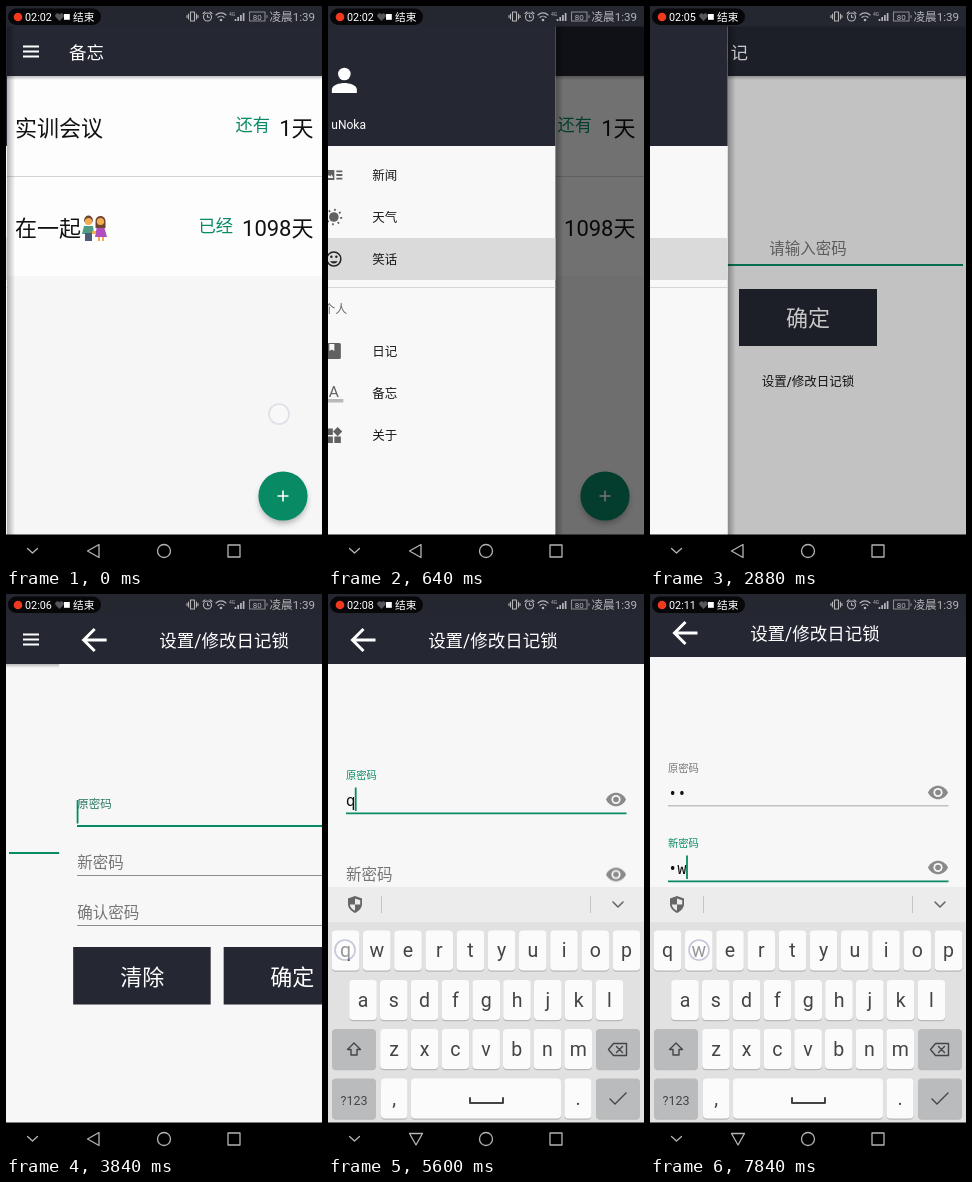
An HTML page for the animation above (8000 ms loop, 316 by 560 pixels).

```html
<!DOCTYPE html>
<html lang="zh-CN">
<head>
<meta charset="utf-8">
<title>备忘</title>
<style>
:root { --green: #088a65; --dark: #252733; --grey: #757575; --out: cubic-bezier(.333, .667, .667, 1); }
html, body { margin: 0; width: 100%; height: 100%; overflow: hidden; background: #f7f7f7; }
svg { display: block; width: 316px; height: 560px; }
text { font-family: Roboto, "Noto Sans CJK SC", "Noto Sans CJK", sans-serif; white-space: pre; }
.big { font-size: 22px; fill: #111; }
.tag { font-size: 17.3px; fill: var(--green); }
.title { font-size: 17.5px; fill: #fff; }
.button { font-size: 22px; font-weight: 500; fill: #fff; text-anchor: middle; }
.mid { text-anchor: middle; }
.end { text-anchor: end; }
.item { font-size: 12.5px; font-weight: 500; fill: #161616; }
.ico { fill: #616161; }
.line { fill: none; stroke-linecap: round; stroke-linejoin: round; }
.hint { font-size: 15.5px; fill: var(--grey); }
.pass { font: 15.5px "Noto Sans Mono", monospace; fill: #111; }
.rule { height: 1px; fill: #8c8c8c; }
.rule.on { height: 2px; fill: var(--green); }
.key { font-size: 19.5px; fill: #444; text-anchor: middle; }

#drawer, #scrim, #settings, #pan, #keys, .field, .field .hint { animation: 8s linear infinite; }
#drawer { animation-name: drawer; }
#scrim { animation-name: scrim; }
#settings { animation-name: slide; }
#pan { animation-name: pan; }
#keys { animation-name: rise; }
#f0 { animation-name: spreadUp; }
#f1 { animation-name: spreadDown; }
#f2 { animation-name: spreadLow; }
#f0 .hint { animation-name: float0; }
#f1 .hint { animation-name: float1; }

@keyframes drawer {
  0%, .5% { transform: translateX(-245px); animation-timing-function: var(--out); }
  11.8% { transform: none; }
  33.4% { transform: none; animation-timing-function: var(--out); }
  40.4%, 100% { transform: translateX(-262px); }
}
@keyframes scrim {
  0%, .5% { opacity: 0; animation-timing-function: var(--out); }
  11.8% { opacity: .6; }
  33.4% { opacity: .6; animation-timing-function: var(--out); }
  40.4%, 100% { opacity: 0; }
}
@keyframes slide {
  0%, 44.4% { transform: translateX(316px); animation-timing-function: var(--out); }
  51.2%, 100% { transform: none; }
}
@keyframes rise {
  0%, 60.1% { transform: translateY(267px); animation-timing-function: var(--out); }
  66.5%, 100% { transform: none; }
}
@keyframes pan {
  0%, 78.6% { transform: none; }
  80% { transform: translateY(-6px); }
  82%, 100% { transform: translateY(-7px); }
}
@keyframes spreadUp { 0%, 69.9% { transform: none; } 70%, 100% { transform: translateY(-12.5px); } }
@keyframes spreadDown { 0%, 69.9% { transform: none; } 70%, 100% { transform: translateY(12.5px); } }
@keyframes spreadLow { 0%, 69.9% { transform: none; } 70%, 100% { transform: translateY(37.5px); } }
@keyframes float0 {
  0%, 46.4% { transform: none; font-size: 15.5px; fill: #757575; }
  48.4% { transform: translateY(-11.8px); font-size: 10.6px; fill: #1c7a63; }
  50.4%, 78.9% { transform: translateY(-26px); font-size: 10.3px; fill: #088a65; }
  79%, 100% { transform: translateY(-26px); font-size: 10.3px; fill: #757575; }
}
@keyframes float1 {
  0%, 79.2% { transform: none; font-size: 15.5px; fill: #757575; }
  80.2% { transform: translateY(-3.4px); font-size: 13px; fill: #555; }
  82%, 100% { transform: translateY(-26px); font-size: 10.3px; fill: #088a65; }
}
</style>
</head>
<body>
<svg viewBox="0 0 316 560">
  <defs>
    <linearGradient id="fadeX"><stop stop-opacity=".3"/><stop offset="1" stop-opacity="0"/></linearGradient>
    <linearGradient id="fadeY" x2="0" y2="1"><stop stop-opacity=".25"/><stop offset="1" stop-opacity="0"/></linearGradient>
    <filter id="soft" x="-50%" y="-50%" width="200%" height="200%"><feGaussianBlur stdDeviation="3"/></filter>
    <g id="bar">
      <rect width="316" height="70" fill="#252733"/>
      <rect y="70" width="316" height="4" fill="url(#fadeY)"/>
      <path d="M17 40.5h16M17 45.5h16M17 50.5h16" stroke="#fff" stroke-width="2"/>
    </g>
    <g id="eye">
      <path d="M-10 0C-6-9 6-9 10 0C6 9-6 9-10 0Z" fill="#8a8a8a"/>
      <circle r="4.6" fill="#f7f7f7"/><circle r="2.8" fill="#8a8a8a"/>
    </g>
  </defs>

  <g id="memo">
    <rect width="316" height="530" fill="#f6f6f6"/>
    <rect y="70" width="316" height="200" fill="#fdfdfd"/>
    <rect y="170" width="316" height="1" fill="#d4d4d4"/>
    <use href="#bar"/>
    <text class="title" x="63" y="52.5">备忘</text>
    <text class="big" x="9" y="130">实训会议</text>
    <text class="tag" x="229.5" y="124.5">还有</text>
    <text class="big end" x="307.5" y="130">1天</text>
    <text class="big" x="9" y="230">在一起</text>
    <g id="couple">
      <path d="M78 220h9l1 8h-2v7h-7v-7h-3z" fill="#4f9c86"/>
      <path d="M79 227h7v8h-7z" fill="#4b5b78"/>
      <path d="M91 220h7l3 11h-12z" fill="#b04fc0"/>
      <path d="M92 231h2v4h-2zM96 231h2v4h-2zM86 225h4v3h-4z" fill="#f3ad4e"/>
      <path d="M89.5 222v-7a5 5 0 0 1 10 0v7z" fill="#6d4530"/>
      <circle cx="82.5" cy="214" r="4.4" fill="#6d4530"/>
      <circle cx="82.5" cy="215.5" r="3.6" fill="#f3ad4e"/><circle cx="94.5" cy="215.5" r="3.6" fill="#f3ad4e"/>
    </g>
    <text class="tag" x="192.5" y="225.5">已经</text>
    <text class="big end" x="307.5" y="230">1098天</text>
    <circle cx="277" cy="494" r="23.5" opacity=".3" filter="url(#soft)"/>
    <circle cx="277" cy="490" r="24.6" fill="#088a65"/>
    <path d="M271.5 490h11M277 484.5v11" stroke="#fff" stroke-width="1.6"/>
  </g>

  <g data-on="2640-8000">
    <rect width="316" height="530" fill="#f7f7f7"/>
    <use href="#bar"/>
    <text class="title" x="63" y="52.5">日记</text>
    <text class="hint mid" x="158" y="248">请输入密码</text>
    <rect x="3" y="258" width="310" height="2" fill="#088a65"/>
    <rect x="89" y="283" width="138" height="57" fill="#252733"/>
    <text class="button" x="158" y="320">确定</text>
    <text class="item mid" x="158" y="380">设置/修改日记锁</text>
  </g>

  <rect id="scrim" width="316" height="530"/>
  <g id="drawer">
    <rect x="246" width="8" height="530" fill="url(#fadeX)"/>
    <rect width="246" height="530" fill="#f8f8f8"/>
    <rect width="246" height="140" fill="#252733"/>
    <path d="M22.5 87v-3.5c0-4.5 8-6.5 12.5-6.5s12.5 2 12.5 6.5v3.5z" fill="#fff"/>
    <circle cx="35" cy="68" r="6.3" fill="#fff"/>
    <text x="22" y="122.5" font-size="12" fill="#fff">uNoka</text>
    <rect y="232" width="246" height="42" fill="#dadada"/>
    <rect y="281" width="246" height="1" fill="#d6d6d6"/>
    <text x="14" y="307.5" font-size="12" fill="#6b6b6b">个人</text>
    <g id="items"></g>
    <g class="ico">
      <path d="M16 164h9v10h-9zM27 164.5h6v1.8h-6zM27 168.1h6v1.8h-6zM27 171.7h6v1.8h-6z"/>
      <path d="M17.5 172l2-3 1.5 1.5 1.3-2 1.7 3.5z" fill="#f8f8f8"/>
      <circle cx="24.5" cy="211" r="4.8"/>
      <circle cx="24.5" cy="211" r="7.3" fill="none" stroke="#616161" stroke-width="2" stroke-dasharray="1.7 4.033"/>
      <circle cx="24.5" cy="253" r="7" fill="none" stroke="#222" stroke-width="1.5"/>
      <path d="M20.8 255.2c1.5 3 6 3 7.4 0z" fill="#222"/>
      <circle cx="22" cy="250.8" r="1.2" fill="#222"/><circle cx="27" cy="250.8" r="1.2" fill="#222"/>
      <rect x="18" y="337" width="13.5" height="16" rx="1.5"/>
      <path d="M20 338h5v7l-2.5-1.6-2.5 1.6z" fill="#f8f8f8"/>
      <text class="mid" x="24.5" y="391" font-size="15.5">A</text>
      <rect x="15" y="393" width="19" height="3.5" fill="#b9b9b9"/>
      <path d="M17 422.5h6.5v6.5h-6.5zM17 430.5h6.5v6.5h-6.5zM25 430.5h6.5v6.5h-6.5zM28.3 421l4.6 4.6-4.6 4.6-4.6-4.6z"/>
    </g>
  </g>

  <g id="settings">
    <rect width="316" height="530" fill="#f7f7f7"/>
    <g id="pan">
      <rect width="316" height="70" fill="#252733"/>
      <path d="M47.5 46H25M35.5 35L24.5 46l11 11" fill="none" stroke="#fff" stroke-width="3"/>
      <text class="title mid" x="165" y="52.5">设置/修改日记锁</text>
      <g id="fields"></g>
      <rect x="14" y="353" width="137.5" height="57.5" fill="#252733"/>
      <rect x="164.5" y="353" width="137.5" height="57.5" fill="#252733"/>
      <text class="button" x="83" y="390.5">清除</text>
      <text class="button" x="233" y="390.5">确定</text>
      <rect id="caret" width="1.8" height="23.5" fill="#088a65"/>
    </g>
  </g>

  <g id="keys">
    <rect y="293" width="316" height="267" fill="#e1e1e1"/>
    <rect y="293" width="316" height="35" fill="#ececec"/>
    <path d="M53.5 302v17M262.5 302v17" stroke="#c4c4c4"/>
    <path d="M27 302l7 2.5v5.5c0 4-3 7-7 9c-4-2-7-5-7-9v-5.5z" fill="#666"/>
    <path d="M27 304.5v6h5.2v-4.3zM27 310.5v6.2c-3-1.5-5-3.7-5.2-6.2z" fill="#ececec"/>
    <path class="line" d="M285 308l5 5 5-5" stroke="#666" stroke-width="1.6"/>
    <g id="caps"></g>
    <g class="line" stroke="#444" stroke-width="1.4">
      <path d="M26 449l6.5 6.5h-3.5v5.5h-6v-5.5h-3.5z"/>
      <path d="M285.500 449.500h13v12h-13l-5-6zM288.500 452.500l6 6M294.500 452.500l-6 6"/>
      <path d="M282 505l5 5 11-11"/>
      <path d="M142 504v5h33v-5" stroke-width="2"/>
    </g>
  </g>

  <rect data-on="0-4800 5320-8000" y="528.5" width="316" height="31.5"/>
  <g class="line" stroke="#b4b4b4" stroke-width="1.3">
    <path d="M21.5 542.5l5 4.5 5-4.5"/>
    <path data-on="0-4800" d="M93 538.5v13l-11.5-6.5z"/>
    <path data-on="4800-8000" d="M81.5 539.5h13l-6.5 11.5z"/>
    <circle cx="158" cy="545" r="6.5"/>
    <rect x="222" y="539" width="12" height="12"/>
  </g>

  <g id="status">
    <rect width="316" height="20.5" fill="#242630"/>
    <rect x="2" y="2.5" width="93" height="16.5" rx="8.2" fill="#07070a"/>
    <text id="carrier" x="6" y="15" font-size="11" fill="#4c4d52">中</text>
    <circle id="rec" cx="12" cy="11" r="4.3" fill="#f0391f"/>
    <text id="clock" x="19" y="14.7" font-size="10.8" fill="#fff"></text>
    <path d="M53.5 15l-4-4a2.3 2.3 0 0 1 4-2.5a2.3 2.3 0 0 1 4 2.5z" fill="#55565b"/>
    <rect x="58" y="8" width="5.8" height="5.8" fill="#fff"/>
    <text x="67" y="15" font-size="10.7" fill="#fff">结束</text>
    <g class="line" stroke="#b5b5b8" stroke-width="1.1">
      <path d="M184.5 6h4v9h-4zM182.5 8v5M190.5 8v5M181 9.5v2M192 9.5v2"/>
      <circle cx="201.5" cy="11" r="4"/><path d="M201.5 9v2.3h1.8M197 7.5l2-1.7M206 7.5l-2-1.7"/>
      <path d="M210 9a7 7 0 0 1 10 0M212 11.5a4.3 4.3 0 0 1 6 0"/>
      <path d="M229.5 15v-2M232.2 15v-4M234.9 15v-6M237.6 15v-8" stroke-width="1.7" stroke-linecap="butt"/>
      <path d="M243.5 6h15.5v9h-15.5zM261 9.5v2" stroke="#8c8c90"/>
    </g>
    <circle cx="215" cy="14" r="1.3" fill="#b5b5b8"/>
    <g fill="#b5b5b8">
      <text x="223" y="9.5" font-size="5">4G</text>
      <text class="mid" x="251.3" y="13.5" font-size="8">80</text>
      <text class="end" x="309" y="15" font-size="11.6">凌晨1:39</text>
    </g>
  </g>
  <circle id="touch" r="10" fill="#fff" fill-opacity=".45" stroke="#8d93b5" stroke-opacity=".5" stroke-width="1.6"/>
</svg>
<script>
const LOOP = 8000;
const $ = id => document.getElementById(id);

['新闻', '天气', '笑话', '日记', '备忘', '关于'].forEach((name, i) => {
  const y = 173.7 + i * 42 + (i > 2 ? 50 : 0);
  $('items').innerHTML += `<text class="item" x="63" y="${y}">${name}</text>`;
});

const fieldY = [218, 268, 318];
['原密码', '新密码', '确认密码'].forEach((name, i) => {
  const y = fieldY[i];
  $('fields').innerHTML += `<g id="f${i}" class="field">
    <text class="hint" x="18" y="${y + 5.7}">${name}</text>
    <text class="pass" x="18" y="${y + 6.5}"></text>
    <rect class="rule" x="18" y="${y + 13}" width="280.5"/>
    <use href="#eye" x="288" y="${y}"/></g>`;
});
const fields = [$('f0'), $('f1')];

function cap(x, y, w, label = '', fill = '#fbfbfb', size = 19.5) {
  $('caps').innerHTML += `<rect x="${x}" y="${y + 1.2}" width="${w}" height="40" rx="4" fill="#b8b8b8"/>
    <rect x="${x}" y="${y}" width="${w}" height="40" rx="4" fill="${fill}"/>
    <text class="key" x="${x + w / 2}" y="${y + 26.5}" style="font-size:${size}px">${label}</text>`;
}
const row = (letters, x, y, step) => [...letters].forEach((c, i) => cap(x + i * step - 13.8, y, 27.6, c));
row('qwertyuiop', 17.6, 336.5, 31.2);
row('asdfghjkl', 35, 386, 30.8);
row('zxcvbnm', 66, 435, 30.7);
for (const [x, y, label] of [[4, 435], [268, 435], [4, 484.5, '?123'], [268, 484.5]]) cap(x, y, 44, label, '#b9bbbc', 12.5);
cap(53, 484.5, 26.5, ',');
cap(83, 484.5, 150);
cap(236.5, 484.5, 27, '.');

// Each entry is [start time, value...]; the latest one that has begun applies
const clock = [[0, 2], [1280, 3], [1900, 4], [2400, 5], [3500, 6], [4480, 7], [4940, 8], [5740, 9], [6300, 10], [7340, 11]];
const typing = [
  [0, 0, '', ''], [3600, 0, '', ''], [5600, 0, 'q', ''], [5920, 0, '•w', ''],
  [6300, 1, '••', ''], [7200, 1, '••', 'q'], [7780, 1, '••', '•w']
];
// start, end, x, y, opacity
const touches = [
  [0, 140, 273, 408, .45], [2400, 2680, 80, 346, 1], [3300, 3480, 158, 376, 1], [4460, 4660, 120, 218, 1],
  [5540, 5700, 17, 356, 1], [5860, 6020, 49, 356, 1], [6240, 6500, 180, 277, .7],
  [7140, 7300, 17, 356, 1], [7740, 8000, 49, 356, 1]
];
const latest = (list, t) => list.filter(e => e[0] <= t).pop();
const setVisible = (el, on) => { el.style.visibility = on ? 'visible' : 'hidden'; };

const timed = [...document.querySelectorAll('[data-on]')].map(el =>
  ({ el, spans: el.dataset.on.split(' ').map(s => s.split('-').map(Number)) }));

function draw(t) {
  for (const { el, spans } of timed) setVisible(el, spans.some(([a, b]) => t >= a && t < b));

  $('clock').textContent = '02:' + String(latest(clock, t)[1]).padStart(2, '0');
  const recording = t < 1760 || t > 7800 || (t - 1760) % 1540 > 480;
  setVisible($('rec'), recording);
  setVisible($('carrier'), !recording);

  const [since, focus, ...texts] = latest(typing, t);
  fields.forEach((f, i) => {
    f.querySelector('.pass').textContent = texts[i];
    f.querySelector('.rule').classList.toggle('on', i === focus);
  });
  const spread = t < 5600 ? 0 : focus ? 12.5 : -12.5;
  $('caret').setAttribute('x', 17.5 + texts[focus].length * 9.3);
  $('caret').setAttribute('y', fieldY[focus] - 12 + spread);
  setVisible($('caret'), (t - since) % 1000 < 500);

  const touch = touches.find(([a, b]) => t >= a && t < b);
  setVisible($('touch'), touch);
  if (touch) {
    $('touch').setAttribute('cx', touch[2]);
    $('touch').setAttribute('cy', touch[3]);
    $('touch').style.opacity = touch[4];
  }
}

const start = performance.now();
function tick() {
  draw((performance.now() - start) % LOOP);
  requestAnimationFrame(tick);
}
tick();
</script>
</body>
</html>
```
